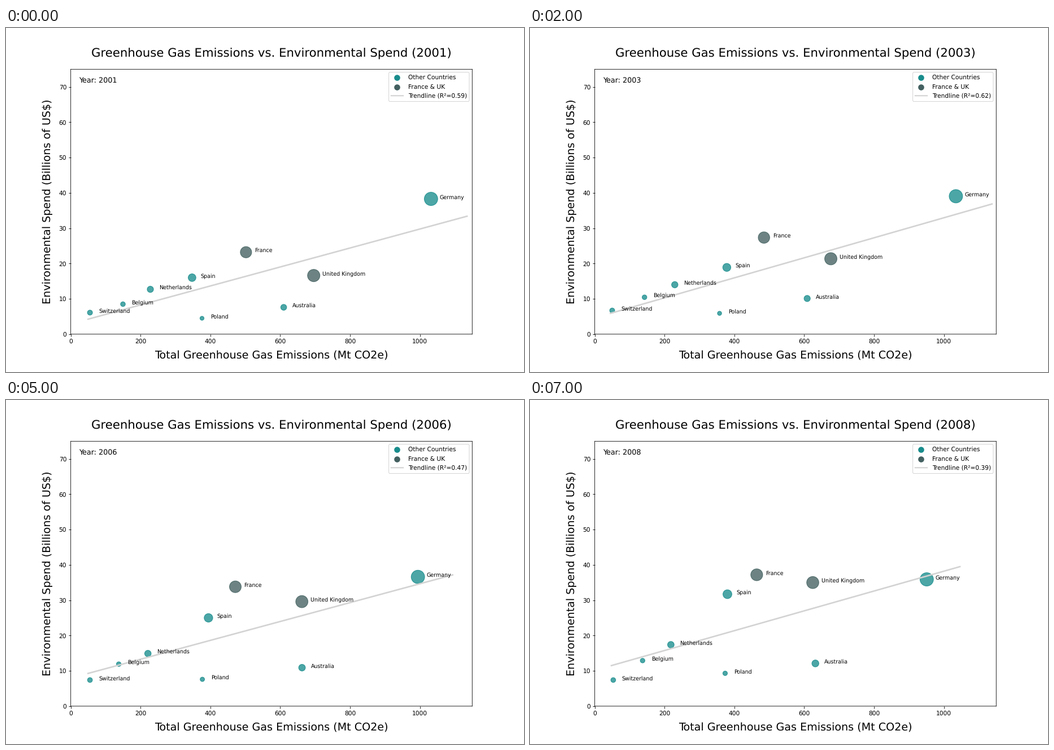
These frames come from a looping animation (917x611 px, 8000 ms). A matplotlib script:

```python
import numpy as np
import matplotlib.pyplot as plt
from matplotlib.animation import FuncAnimation

W, H = 917, 611
DPI = W / 12
FIRST, LAST = 2001, 2008
KEY_YEARS = [2001, 2002, 2004, 2006, 2008]
PAIR = ("France", "United Kingdom")
TEAL, SLATE, GREY = "teal", "darkslategray", "lightgray"
MAX_AREA = 500


class Country:
    """Emissions and spend at the key years, first and last relative area."""

    def __init__(self, name, emissions, spend, area):
        self.name, self.emissions, self.spend, self.area = name, emissions, spend, area

    def at(self, year):
        return (np.interp(year, KEY_YEARS, self.emissions),
                np.interp(year, KEY_YEARS, self.spend))

    def size(self, year):
        return MAX_AREA * np.interp(year, [FIRST, LAST], self.area)


COUNTRIES = [
    Country("Australia", [610, 619, 598, 662.5, 632], [7.6, 9.5, 10.7, 10.9, 12.1], [0.195, 0.27]),
    Country("Belgium", [149.5, 141, 144, 137.5, 137], [8.5, 9, 11.9, 11.9, 12.9], [0.125, 0.12]),
    Country("France", [502, 485.5, 484, 471.5, 464], [23.2, 25.7, 29, 33.8, 37.2], [0.71, 0.79]),
    Country("Germany", [1032, 1042, 1027, 994.5, 951], [38.3, 40, 38.1, 36.6, 35.9], [1, 1]),
    Country("Netherlands", [228, 227, 231.5, 221, 218], [12.7, 14, 14, 14.9, 17.4], [0.22, 0.24]),
    Country("Poland", [376, 359, 356, 377, 373.5], [4.5, 5.6, 6.2, 7.6, 9.3], [0.09, 0.115]),
    Country("Spain", [347.5, 365, 391.5, 394.5, 380], [16, 18.5, 19.3, 25, 31.7], [0.33, 0.44]),
    Country("Switzerland", [55, 50, 50, 55, 53], [6.1, 6.6, 6.8, 7.4, 7.4], [0.143, 0.13]),
    Country("United Kingdom", [696, 674.5, 678, 662, 624.5], [16.6, 16.7, 26, 29.6, 35], [0.85, 0.82]),
]


def fit(x, y):
    """Trendline ends and R² of a straight-line fit."""
    line = np.polyfit(x, y, 1)
    ends = np.array([0.9 * x.min(), 1.1 * x.max()])
    return ends, np.polyval(line, ends), np.corrcoef(x, y)[0, 1] ** 2


# Soft, unsnapped strokes and glyphs
plt.rcParams.update({"path.snap": False, "text.hinting": "none"})

# The tiny margin keeps the pixel size from truncating downwards
fig, ax = plt.subplots(figsize=((W + 0.01) / DPI, (H + 0.01) / DPI), dpi=DPI)
ax.set_xlim(0, 1150)
ax.set_ylim(0, 75)
ax.set_xlabel("Total Greenhouse Gas Emissions (Mt CO2e)", fontsize=18, labelpad=10)
ax.set_ylabel("Environmental Spend (Billions of US$)", fontsize=18, labelpad=10)
title = ax.set_title("", fontsize=20, pad=20)
year_text = ax.text(0.02, 0.95, "", fontsize=12, transform=ax.transAxes)

groups = [
    ([c for c in COUNTRIES if c.name not in PAIR], ax.scatter([], [], color=TEAL, alpha=0.7)),
    ([c for c in COUNTRIES if c.name in PAIR], ax.scatter([], [], color=SLATE, alpha=0.7)),
]
trend, = ax.plot([], [], color=GREY, lw=2.5)
labels = [ax.text(0, 0, c.name, fontsize=9) for c in COUNTRIES]


def key_dot(color, label):
    return ax.scatter([], [], s=100, color=color, alpha=0.9, linewidths=0, label=label)


keys = [
    key_dot(TEAL, "Other Countries"),
    key_dot(SLATE, "France & UK"),
    ax.plot([], [], color=GREY, lw=2, label="Trendline (R²=0.00)")[0],
]
legend = ax.legend(handles=keys, loc="upper right", fontsize=10, labelspacing=0.54)


def update(i):
    year = FIRST + i
    title.set_text(f"Greenhouse Gas Emissions vs. Environmental Spend ({year})")
    year_text.set_text(f"Year: {year}")

    for members, dots in groups:
        dots.set_offsets([c.at(year) for c in members])
        dots.set_sizes([c.size(year) for c in members])

    x, y = np.array([c.at(year) for c in COUNTRIES]).T
    for label, cx, cy in zip(labels, x, y):
        label.set_position((cx + 25, cy))

    ends, heights, r2 = fit(x, y)
    trend.set_data(ends, heights)
    legend.get_texts()[-1].set_text(f"Trendline (R²={r2:.2f})")


anim = FuncAnimation(fig, update, frames=LAST - FIRST + 1, init_func=lambda: update(0),
                     interval=1000, repeat=True, repeat_delay=0)
plt.show()
```
